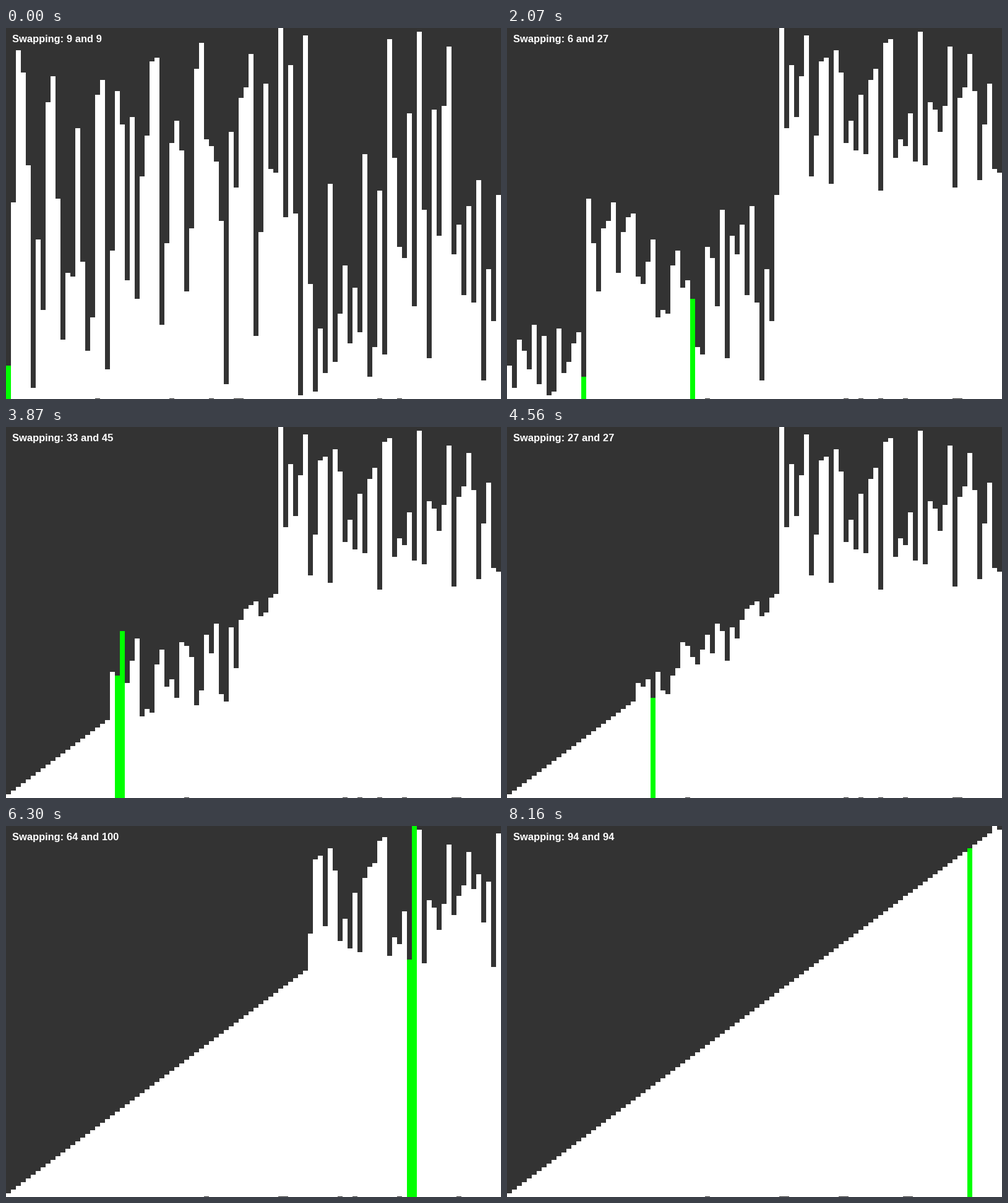
A matplotlib script that plays this animation: 800 by 600 pixels, repeating every 8190 ms.

```python
from itertools import islice

import matplotlib.pyplot as plt
from matplotlib.animation import FuncAnimation

W, H, DPI = 800, 600, 100
FRAMES, STEP_MS = 273, 30
BACK, BAR, ACTIVE = "#333333", "#ffffff", "#00ff00"

VALUES = [
    9, 53, 94, 88, 63, 3, 43, 24, 80, 87, 54, 16, 34, 33, 73, 37, 13, 22, 82, 86,
    8, 40, 83, 74, 32, 76, 27, 60, 71, 91, 92, 20, 42, 69, 75, 67, 29, 46, 89, 96,
    70, 68, 64, 48, 4, 72, 57, 81, 84, 93, 17, 45, 85, 62, 61, 100, 49, 90, 50, 1,
    98, 31, 2, 19, 7, 58, 10, 23, 36, 15, 30, 18, 66, 6, 14, 56, 12, 97, 65, 41,
    38, 77, 25, 99, 51, 11, 78, 44, 79, 95, 39, 47, 28, 52, 26, 59, 5, 35, 21, 55,
]
N = len(VALUES)
BAR_W = W / N


def quicksort(a, lo, hi):
    """Yield (array, i, j) after each swap; pivot placement stays silent."""
    if lo >= hi:
        return
    i = lo
    for j in range(lo, hi):
        if a[j] < a[hi]:
            a[i], a[j] = a[j], a[i]
            yield tuple(a), i, j
            i += 1
    a[i], a[hi] = a[hi], a[i]
    yield from quicksort(a, lo, i - 1)
    yield from quicksort(a, i + 1, hi)


steps = list(islice(quicksort(VALUES[:], 0, N - 1), FRAMES))

fig = plt.figure(figsize=(W / DPI, H / DPI), dpi=DPI, facecolor=BACK)
ax = fig.add_axes([0, 0, 1, 1])
ax.set_xlim(0, W)
ax.set_ylim(H, 0)
ax.axis("off")

bars = [
    ax.add_patch(plt.Rectangle((k * BAR_W, 0), BAR_W, 1, lw=0, antialiased=False))
    for k in range(N)
]
label = ax.text(10, 23, "", color=BAR, family="Liberation Sans", weight="bold",
                size=16.5 * 72 / DPI, va="baseline", zorder=5)


def draw(frame):
    values, i, j = steps[min(frame, len(steps) - 1)]
    for k, (bar, v) in enumerate(zip(bars, values)):
        # Truncation leaves a one-pixel gap below a few bars.
        height = v / N * H
        bar.set_y(int(H - height))
        bar.set_height(int(height))
        bar.set_facecolor(ACTIVE if k in (i, j) else BAR)
    label.set_text(f"Swapping: {values[i]} and {values[j]}")
    return [*bars, label]


anim = FuncAnimation(fig, draw, frames=FRAMES, interval=STEP_MS, repeat=True,
                     repeat_delay=0, blit=False)
plt.show()
```
